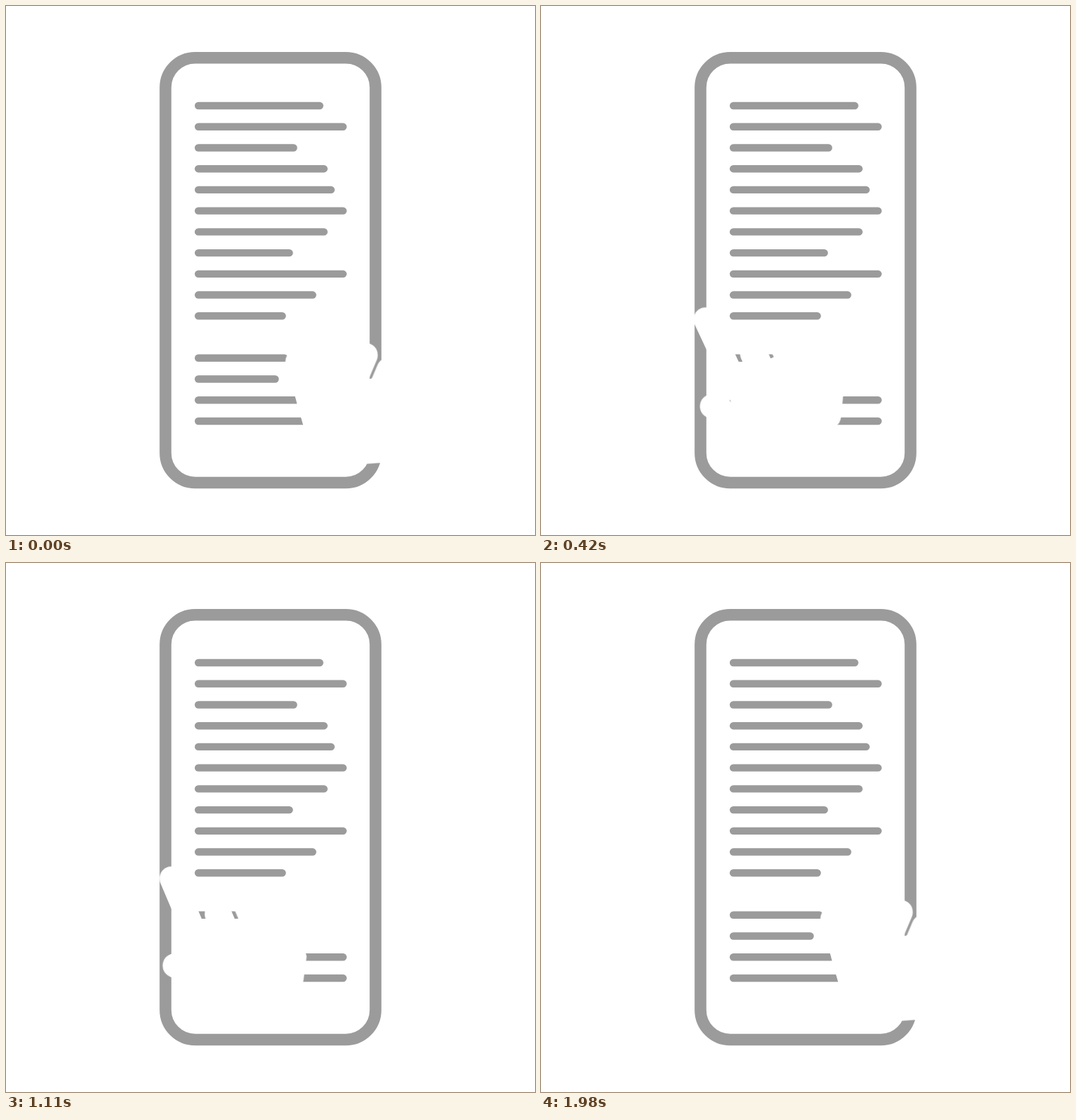
An HTML page that plays this animation: 748x748 px, repeating every 2400 ms.

```html
<!DOCTYPE html>
<html lang="en">
<head>
<meta charset="utf-8">
<title>Swipe gesture</title>
<style>
  html, body { margin: 0; width: 100%; height: 100%; overflow: hidden; background: #fff; }
  svg { display: block; width: 100vw; height: 100vh; }
  .row { stroke: #9b9b9b; stroke-width: 10.4; stroke-linecap: round; }
  .frame { fill: none; stroke: #9b9b9b; stroke-width: 16.6; }
  .edge { fill: none; stroke: #d8d8d8; }
  .hand { stroke: #fff; fill: #fff; stroke-linecap: round; stroke-linejoin: round; }
  .pages, .edge, .hand, .finger { animation: 2400ms infinite; }

  .pages { animation-name: swipe; }
  @keyframes swipe {
    0% { transform: translateX(328px); animation-timing-function: cubic-bezier(.333, 0, .667, 1); }
    12.5%, 100% { transform: none; }
  }

  .edge { animation-name: reveal; animation-timing-function: step-end; }
  @keyframes reveal {
    0% { opacity: 0; }
    10.5% { opacity: 1; }
  }

  /* Push across the screen, linger at the left, then swing back to rest. */
  .hand { animation-name: swing; }
  @keyframes swing {
    0% { transform: translate(402px, 467px) rotate(-16deg); animation-timing-function: ease-in-out; }
    6.25% { transform: translate(438px, 408px) rotate(17deg); animation-timing-function: ease-in; }
    11.25% { transform: translate(285px, 426px) rotate(-15deg); animation-timing-function: ease-out; }
    26.25% { transform: translate(197px, 455px) rotate(-32deg); animation-timing-function: ease-in; }
    46.25% { transform: translate(233.5px, 446px) rotate(-23deg); animation-timing-function: linear; }
    57.5% { transform: translate(382.6px, 474px) rotate(-23deg); animation-timing-function: ease-out; }
    67.5% { transform: translate(529px, 383px) rotate(5deg); animation-timing-function: ease-in-out; }
    82.5%, 100% { transform: translate(402px, 467px) rotate(-16deg); }
  }

  /* Fingers are relaxed at rest and straighten for the swipe. */
  .finger { animation-name: straighten; animation-timing-function: ease-in-out; }
  @keyframes straighten {
    0%, 57.5%, 100% { transform: translate(var(--x), var(--y)) rotate(var(--turn)); }
    6.25%, 46.25% { transform: translate(0px, 0px) rotate(0deg); }
  }
  .index { --x: 0px; --y: 37px; --turn: 0deg; stroke-width: 34; }
  .middle { --x: 7px; --y: -27px; --turn: 5deg; stroke-width: 38; }
  .ring { --x: 13px; --y: -22px; --turn: 39deg; stroke-width: 34.5; }
  .pinky { --x: 0px; --y: -1px; --turn: 39deg; stroke-width: 35; }
  .thumb { --x: 52px; --y: 0px; --turn: 35deg; stroke-width: 34; }
</style>
</head>
<body>
<svg viewBox="0 0 748 748">
  <defs>
    <clipPath id="screen"><rect x="232" y="80" width="284" height="588" rx="35"/></clipPath>
    <g id="page"></g>
  </defs>
  <g clip-path="url(#screen)">
    <g class="pages">
      <use href="#page" x="-328"/>
      <use href="#page"/>
      <path class="edge" d="M239 88Q228 98 228 115V632Q228 649 239 659"/>
    </g>
  </g>
  <rect class="frame" x="225.5" y="73.2" width="297" height="600.8" rx="42"/>
  <g class="hand">
    <path stroke-width="6" d="M-14 92H134V139L130 175L114 202Q106 217 92 209L73 204L54 200L20 189L-14 162Z"/>
    <line class="finger index" y2="110"/>
    <g transform="translate(41 72)"><line class="finger middle" y2="75"/></g>
    <g transform="translate(82 77)"><line class="finger ring" y2="70"/></g>
    <g transform="translate(121 85)"><line class="finger pinky" y2="65"/></g>
    <g transform="translate(-44 115)"><line class="finger thumb" x2="44" y2="52"/></g>
  </g>
</svg>
<script>
const page = document.getElementById('page');

// Widths of the text rows; 0 leaves a blank line.
const widths = [182, 215, 145, 188, 198, 215, 188, 139, 215, 172, 129, 0, 132, 119, 215, 215];

widths.forEach((width, i) => {
  if (!width) return;
  const row = document.createElementNS('http://www.w3.org/2000/svg', 'path');
  row.setAttribute('class', 'row');
  row.setAttribute('d', `M272 ${141 + i * 29.73}h${width - 10.4}`);
  page.append(row);
});
</script>
</body>
</html>
```
